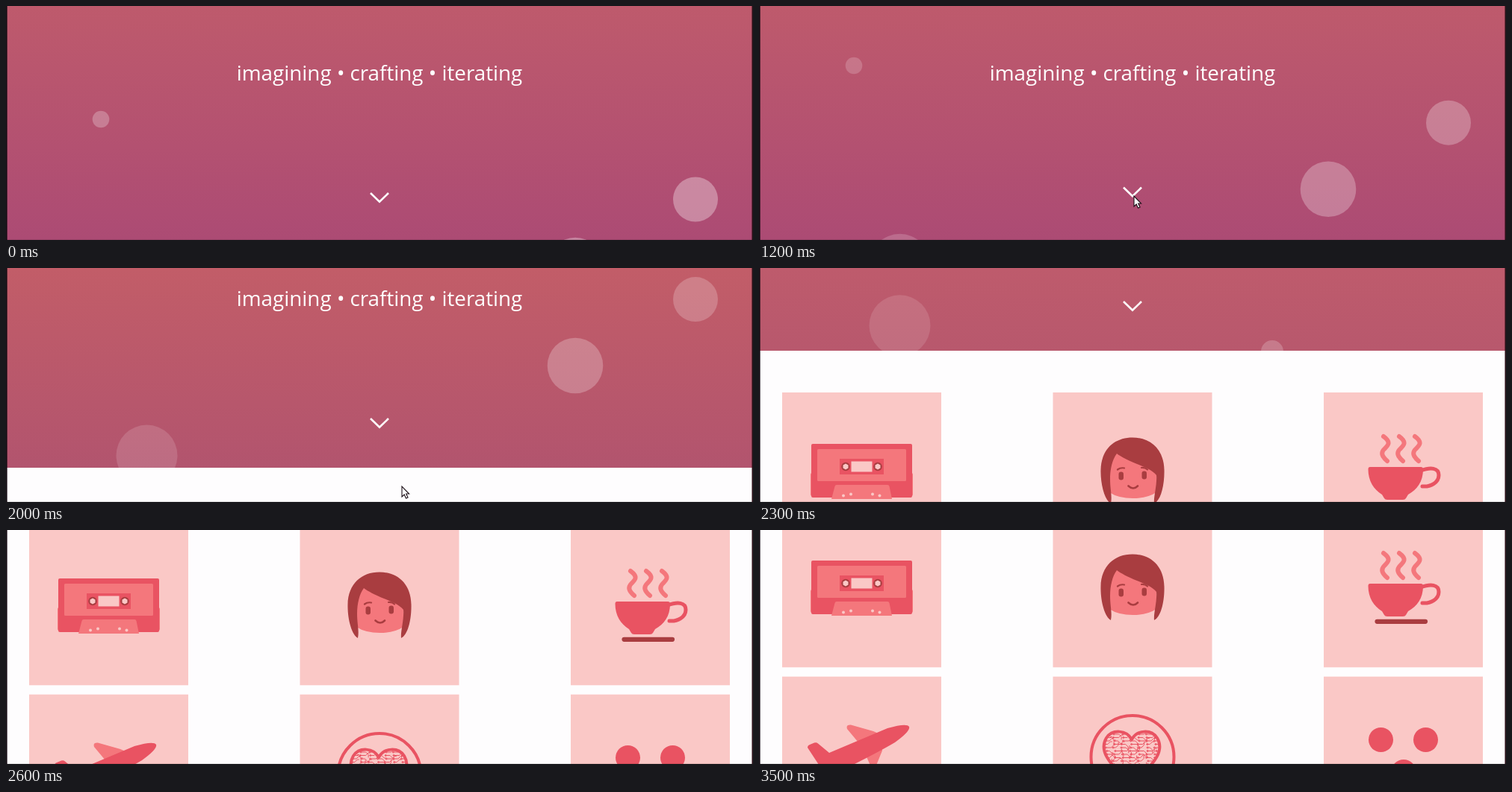
An HTML page that plays this animation: 1000 by 314 pixels, repeating every 3.6 s.

```html
<!DOCTYPE html>
<html lang="en">
<head>
<meta charset="utf-8">
<title>Portfolio scroll</title>
<style>
  html, body { margin: 0; width: 100%; height: 100%; overflow: hidden; background: #fefdfe; }
  svg { display: block; width: 100%; height: 100%; }
  text { font: 27.8px "Open Sans", "Noto Sans", sans-serif; fill: #fff; text-anchor: middle; }
  .line { fill: none; stroke-linecap: round; stroke-linejoin: round; }
  .card, .pale { fill: #fac8c6; }
  .red { fill: #e95362; }
  .pink { fill: #f4777c; }
  .dark { fill: #a93d40; }
  .red-line { stroke: #e95362; }
  .pink-line { stroke: #f4777c; }
  .dark-line { stroke: #a93d40; }
</style>
</head>
<body>
<svg viewBox="0 0 1000 314" preserveAspectRatio="none">
  <defs>
    <linearGradient id="sky" gradientUnits="userSpaceOnUse" x1="0" y1="0" x2="0" y2="314">
      <stop id="skyTop" offset="0"/>
      <stop id="skyEnd" offset="1"/>
    </linearGradient>
    <clipPath id="heroClip"><rect width="1000" height="317"/></clipPath>
    <path id="heart" d="M499 281C492 268 473 267 465 279C456 294 464 312 499 338C534 312 542 294 533 279C525 267 506 268 499 281Z"/>
    <clipPath id="heartClip"><use href="#heart"/></clipPath>
    <path id="steam" d="M836 31C847 39 842 43 837 48C832 53 834 58 841 64"/>
  </defs>

  <rect id="hero" width="1000" fill="url(#sky)"/>

  <g id="heroItems" clip-path="url(#heroClip)">
    <g id="bubbles" fill="#fff"></g>
    <text x="500" y="100">imagining • crafting • iterating</text>
    <path id="chevron" class="line" stroke="#fff" stroke-width="2.6" style="stroke-linecap:butt;stroke-linejoin:miter" d="M488 251L500 262.7L512 251"/>
  </g>

  <g id="cards">
    <g id="tiles" class="card"></g>

    <g id="cassette">
      <rect class="pink" x="69" y="80" width="137" height="31" rx="2"/>
      <rect class="red" x="70" y="41" width="135" height="72" rx="2"/>
      <rect class="pink" x="78" y="48" width="119" height="43" rx="1.5"/>
      <rect class="red" x="108" y="61" width="59" height="21"/>
      <rect class="pale" x="123.5" y="64.5" width="28" height="14"/>
      <circle class="dark" cx="116" cy="71.5" r="5.8"/>
      <circle class="dark" cx="159" cy="71.5" r="5.8"/>
      <path class="pale" d="M116 67.5l3.5 2v4l-3.5 2l-3.5-2v-4zM159 67.5l3.5 2v4l-3.5 2l-3.5-2v-4z"/>
      <path class="pink" d="M104 96H172Q174 96 174.500 98L178 115H97L101.500 98Q102 96 104 96Z"/>
      <g class="pale">
        <circle cx="113" cy="110.500" r="2"/><circle cx="123" cy="108.500" r="2"/>
        <circle cx="152" cy="108.500" r="2"/><circle cx="161.500" cy="110.500" r="2"/>
      </g>
    </g>

    <g id="face">
      <path class="pink" d="M469 50H532V106Q520 114 500.500 114Q481 114 469 106Z"/>
      <path class="dark" d="M471 121C463 117 457 96 457.500 76C458 48 476 32.500 500 32.500C524 32.500 542 48 542.500 76C543 96 538 117 529 121C528 112 533 97 532 83C526 76 516 72 506 68C494 63 484 58 479 54C473 62 470 75 470 88C470 102 473 111 471 121Z"/>
      <rect class="dark" x="481.500" y="78.500" width="6.500" height="11" rx="3.200"/>
      <rect class="dark" x="512.500" y="77.500" width="6.500" height="11" rx="3.200"/>
      <path class="line dark-line" stroke-width="2.200" d="M480 75.500Q484 72.500 489 73.500M512 73Q517 72.500 520 75.500"/>
      <path class="line dark-line" stroke-width="2.600" d="M494.500 97.500Q501 103.500 507 97.500"/>
    </g>

    <g id="cup">
      <g class="line pink-line" stroke-width="6">
        <use href="#steam"/><use href="#steam" x="21"/><use href="#steam" x="42"/>
      </g>
      <path class="line red-line" stroke-width="5" d="M886 77C899 72 910 73 910 83C910 93 899 99 888 98"/>
      <path class="red" d="M818 72H886Q889 72 889 75C889 92 881 102 869 109L866 114Q865 116 862 116H841Q838 116 837 114L834 109C823 102 815.500 91 815.500 75Q815.500 72 818 72Z"/>
      <path class="line dark-line" stroke-width="6.200" d="M827.500 122.800H892"/>
    </g>

    <g id="plane">
      <path class="pink" d="M118 267Q116 261 123 261.500L153 270Q162 273 163 280L165 296Q161 306 156 318H150L138 291Z"/>
      <path class="red" d="M65 292Q65 289 68 288L74 285.500Q77 284.500 79 286.500L94 299L172 266Q198 258.500 201 264Q203 270 182 285Q160 298 120 318H82Z"/>
    </g>

    <g id="love" class="line red-line">
      <circle cx="500" cy="304.500" r="55.500" stroke-width="4"/>
      <g clip-path="url(#heartClip)"><path id="circuit" stroke-width="1"/></g>
      <use href="#heart" stroke-width="4"/>
    </g>

    <g id="dots" class="red">
      <circle cx="832.500" cy="281.500" r="16.500"/>
      <circle cx="892.500" cy="281.500" r="16.500"/>
      <circle cx="863" cy="324.500" r="16.500"/>
    </g>
  </g>

  <path id="cursor" d="M0 0V14L3.200 11L5.500 16L8 15L5.700 10H9.600Z" fill="#fff" stroke="#1c1018" stroke-width="1.100"/>

  <rect width="1.600" height="314" fill="#150d14"/>
  <rect x="998.500" width="1.500" height="314" fill="#2a1018"/>
  <rect y="313" width="1000" height="1" fill="#000" opacity=".13"/>
</svg>

<script>
const LOOP = 3600, STEP = 100, END_SCROLL = 401, HERO_HEIGHT = 317;
const $ = id => document.getElementById(id);

function add(parent, tag, attrs) {
  const el = document.createElementNS('http://www.w3.org/2000/svg', tag);
  for (const key in attrs) el.setAttribute(key, attrs[key]);
  return parent.appendChild(el);
}

// Rows are [time, ...values]; values between rows are linear.
function sample(rows, t) {
  if (t <= rows[0][0]) return rows[0].slice(1);
  for (let i = 1; i < rows.length; i++) {
    const a = rows[i - 1], b = rows[i];
    if (t <= b[0]) {
      const k = (t - a[0]) / (b[0] - a[0]);
      return a.slice(1).map((v, j) => v + (b[j + 1] - v) * k);
    }
  }
  return rows[rows.length - 1].slice(1);
}

const scrollRows = [
  [1800, 0], [1900, 14], [2000, 49], [2100, 95], [2200, 149], [2300, 206],
  [2400, 268], [2500, 326], [2600, 377], [2700, 394], [2800, 400], [2900, 401]
];
const skyRows = [
  [1800, 190, 90, 108, 172, 75, 116],
  [2000, 194, 93, 104, 178, 84, 110],
  [2300, 190, 91, 108, 184, 88, 109]
];
const cursorRows = [
  [700, 545, 350], [800, 532, 326], [900, 519, 298], [1000, 508, 270], [1100, 502, 255],
  [1800, 502, 255], [1900, 514, 272], [2000, 530, 293], [2100, 545, 320], [2200, 555, 350]
];

// Height is y - speed * s + drag * s², opacity is alpha - fade * s.
const bubbles = [
  { x: 923, r: 30, y: 259.5, speed: 88, drag: 1.9, alpha: .33, fade: .06 },
  { x: 762, r: 37.3, y: 348, speed: 87, drag: 1.5, alpha: .32, fade: .04 },
  { x: 127, r: 11.3, y: 152, speed: 62, drag: 1.7, alpha: .25, fade: .05 },
  { x: 188.5, r: 41, y: 416, speed: 57.7, drag: 0, alpha: .23, fade: .045 },
  { x: 687, r: 15, y: 456, speed: 60, drag: 0, alpha: .3, fade: .04 }
];
for (const b of bubbles) b.el = add($('bubbles'), 'circle', { cx: b.x, r: b.r });

for (const y of [-28, 196.7])
  for (const x of [31, 393.5, 756])
    add($('tiles'), 'rect', { x, y, width: 213, height: 212.3 });

function drawCircuit() {
  let seed = 7, d = '';
  const random = () => (seed = seed * 16807 % 2147483647) / 2147483647;
  for (let y = 274; y < 335; y += 4.5) {
    for (let x = 463; x < 536; x += 11) {
      const run = 3 + random() * 5, bend = (random() < .5 ? -1 : 1) * 3.5;
      const px = x + random() * 3;
      d += `M${px} ${y}h${run}l${Math.abs(bend)} ${bend}` + (random() < .5 ? 'h2' : `v${bend}`);
      d += `M${px} ${y}m-1 0a1 1 0 1 0 2 0a1 1 0 1 0-2 0`;
    }
  }
  $('circuit').setAttribute('d', d);
}
drawCircuit();

const smooth = k => k * k * (3 - 2 * k);
const easeOutSoft = k => smooth(Math.pow(k, .72));

// Two hops in every two seconds, the second half as high.
function hop(t) {
  const p = t % 2000;
  const rows = [[0, 0], [400, 0], [800, -15], [1000, 0], [1200, -7.5], [1600, 0], [2000, 0]];
  const i = rows.findIndex((row, n) => p < rows[n + 1][0]);
  const [t0, y0] = rows[i], [t1, y1] = rows[i + 1];
  return y0 + (y1 - y0) * easeOutSoft((p - t0) / (t1 - t0));
}

const move = (id, x, y) => $(id).setAttribute('transform', `translate(${x} ${y})`);

function render(t) {
  const s = t / 1000;
  const [scroll] = sample(scrollRows, t);
  const edge = Math.max(0, HERO_HEIGHT - scroll);
  const sky = sample(skyRows, t).map(Math.round);

  $('hero').setAttribute('height', edge);
  $('sky').setAttribute('y2', Math.max(1, Math.min(314, edge)));
  $('skyTop').setAttribute('stop-color', `rgb(${sky.slice(0, 3)})`);
  $('skyEnd').setAttribute('stop-color', `rgb(${sky.slice(3)})`);

  for (const b of bubbles) {
    b.el.setAttribute('cy', b.y - b.speed * s + b.drag * s * s);
    b.el.setAttribute('opacity', Math.max(0, b.alpha - b.fade * s));
  }
  move('heroItems', 0, -scroll);
  move('chevron', 0, hop(t));
  move('cards', 0, END_SCROLL - scroll);
  move('cursor', ...sample(cursorRows, t));
}

const start = performance.now();
function tick() {
  const t = (performance.now() - start) % LOOP;
  render(Math.floor(t / STEP) * STEP);
  requestAnimationFrame(tick);
}
tick();
</script>
</body>
</html>
```
